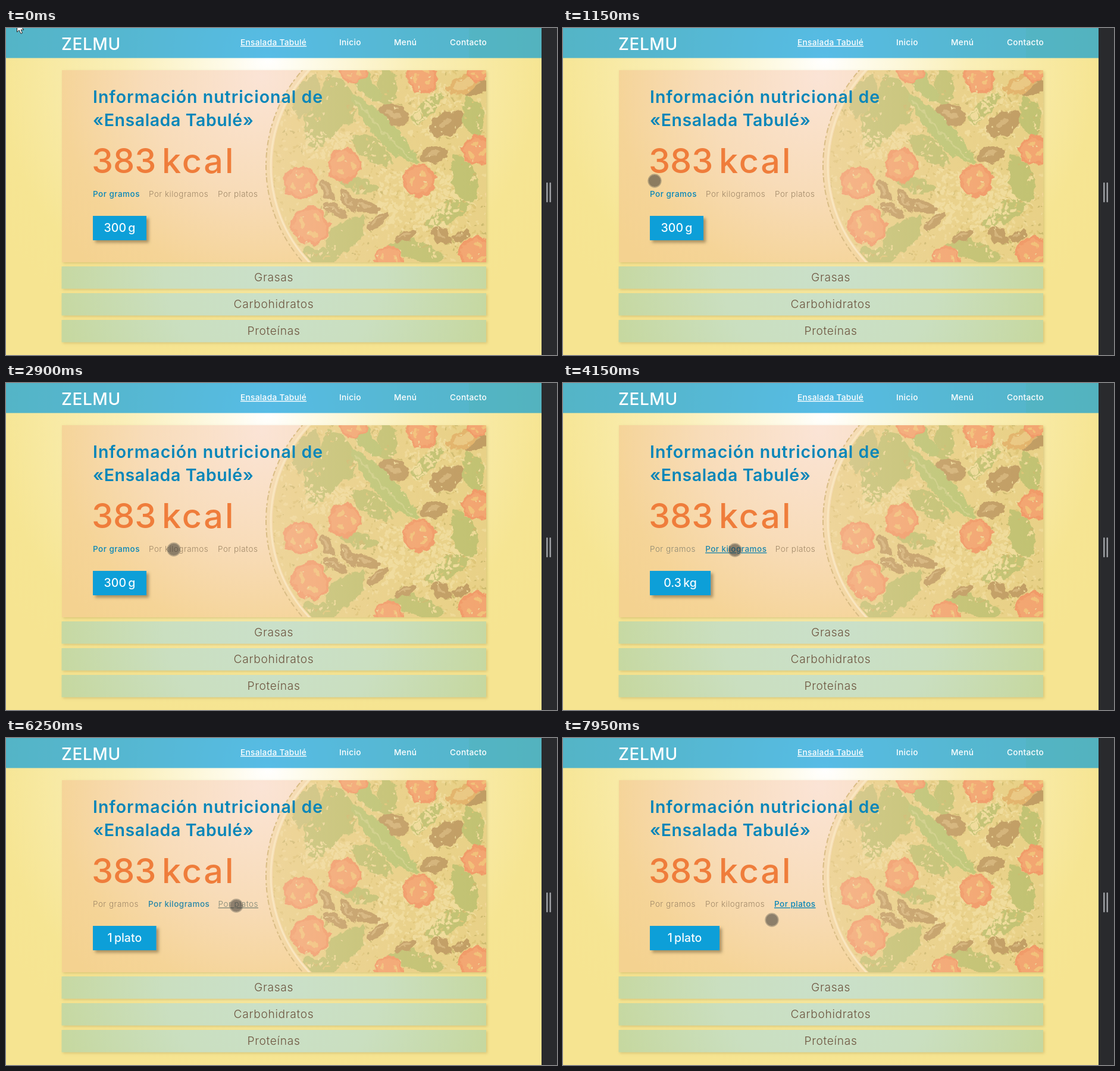
These frames come from a looping animation (926 px wide and 550 px high, 8000 ms). An HTML page:

```html
<!DOCTYPE html>
<html lang="es">
<head>
<meta charset="utf-8">
<title>Información nutricional</title>
<style>
  html, body { margin: 0; width: 100%; height: 100%; overflow: hidden; background: #292a2d; }
  svg { display: block; width: 926px; height: 550px; }
  text { font-family: Inter, "Open Sans", sans-serif; letter-spacing: .035em; }
  .nav { font-size: 13.7px; font-weight: 500; fill: #fff; letter-spacing: .022em; }
  .title { font-size: 28.5px; font-weight: 600; fill: #0886b9; }
  .energy { font-size: 57.5px; font-weight: 500; fill: #ef7d3b; }
  .tab { font-size: 13.5px; }
  .bar { font-size: 19.2px; font-weight: 300; fill: #6d543f; text-anchor: middle; }
  #amount { font-size: 19.5px; font-weight: 500; fill: #f4fbff; text-anchor: middle; letter-spacing: 0; }
</style>
</head>
<body>
<svg viewBox="0 0 926 550" xmlns="http://www.w3.org/2000/svg">
  <defs>
    <radialGradient id="page" gradientUnits="userSpaceOnUse" cx="440" cy="50" r="540">
      <stop offset="0" stop-color="#fff"/>
      <stop offset=".12" stop-color="#fefbea"/>
      <stop offset=".45" stop-color="#faefb8"/>
      <stop offset=".85" stop-color="#f6e593"/>
      <stop offset="1" stop-color="#f6e491"/>
    </radialGradient>
    <radialGradient id="paper" gradientUnits="userSpaceOnUse" cx="430" cy="80" r="430">
      <stop offset="0" stop-color="#fbe4d6"/>
      <stop offset=".45" stop-color="#f8dcb9"/>
      <stop offset=".8" stop-color="#f5d497"/>
      <stop offset="1" stop-color="#f4d290"/>
    </radialGradient>
    <radialGradient id="mint" gradientUnits="userSpaceOnUse" cx="450" cy="400" r="370">
      <stop offset="0" stop-color="#cae0ca"/>
      <stop offset=".5" stop-color="#cadfc0"/>
      <stop offset="1" stop-color="#c6d8a0"/>
    </radialGradient>
    <linearGradient id="wash">
      <stop offset="0" stop-color="#fadcb8" stop-opacity=".4"/>
      <stop offset=".5" stop-color="#f8d9a2" stop-opacity=".25"/>
      <stop offset="1" stop-color="#f5d680" stop-opacity=".14"/>
    </linearGradient>
    <clipPath id="cardClip"><path d="M94 71H807V394H94Z"/></clipPath>
    <clipPath id="dishClip"><circle cx="680" cy="232" r="232"/></clipPath>
    <filter id="shadow" x="-10%" y="-30%" width="125%" height="180%">
      <feDropShadow dx="2" dy="2" stdDeviation="2.2" flood-color="#a89248" flood-opacity=".36"/>
    </filter>
    <filter id="deep" x="-10%" y="-20%" width="130%" height="160%">
      <feDropShadow dx="4" dy="4" stdDeviation="2.5" flood-color="#6d5a38" flood-opacity=".55"/>
    </filter>
    <filter id="rough" filterUnits="userSpaceOnUse" x="430" y="60" width="390" height="345" color-interpolation-filters="sRGB">
      <feTurbulence type="fractalNoise" baseFrequency=".07" numOctaves="3" seed="4"/>
      <feDisplacementMap in="SourceGraphic" scale="14" xChannelSelector="R" yChannelSelector="G"/>
    </filter>
  </defs>

  <path d="M0 0H900V550H0Z" fill="url(#page)"/>
  <path d="M0 0H900V50.500H0Z" fill="#11a0dc" fill-opacity=".7"/>
  <path d="M778 0H900V50.500H778Z" fill="#4cab9c" fill-opacity=".16"/>
  <path d="M900 0H926V550H900Z" fill="#292a2d"/>
  <path d="M909.3 261V292M914.7 261V292" stroke="#a2a5a9" stroke-width="2.4" stroke-linecap="round"/>

  <text x="93" y="37" font-size="28" font-weight="500" fill="#fff" style="letter-spacing:.02em">ZELMU</text>
  <text class="nav" x="394" y="29" text-decoration="underline">Ensalada Tabulé</text>
  <text class="nav" x="560" y="29">Inicio</text>
  <text class="nav" x="652" y="29">Menú</text>
  <text class="nav" x="746" y="29">Contacto</text>

  <path d="M94 71H807V394H94Z" fill="url(#paper)" filter="url(#shadow)"/>
  <g clip-path="url(#cardClip)">
    <circle cx="680" cy="232" r="243" fill="#f3d9a6" fill-opacity=".6" stroke="#d9bd86" stroke-width="2" stroke-dasharray="9 3 4 5"/>
    <circle cx="680" cy="232" r="235" fill="none" stroke="#f9e6c0" stroke-width="3"/>
    <g clip-path="url(#dishClip)">
      <g id="salad" filter="url(#rough)"></g>
      <path d="M436 71H807V394H436Z" fill="url(#wash)"/>
    </g>
  </g>

  <text class="title" x="146" y="126">Información nutricional de</text>
  <text class="title" x="146" y="165" style="letter-spacing:.02em">«Ensalada Tabulé»</text>
  <text class="energy" x="144" y="244" style="letter-spacing:0">383</text>
  <text class="energy" x="262" y="244" style="letter-spacing:.05em">kcal</text>
  <text class="tab" y="284">Por gramos</text>
  <text class="tab" y="284">Por kilogramos</text>
  <text class="tab" y="284">Por platos</text>
  <rect id="button" x="146" y="316" height="41" fill="#109fd8" filter="url(#deep)"/>
  <text id="amount" y="343"></text>

  <g fill="url(#mint)" filter="url(#shadow)">
    <path d="M93.500 401H807V438.500H93.500Z"/>
    <path d="M93.500 446H807V483.500H93.500Z"/>
    <path d="M93.500 491H807V528.500H93.500Z"/>
  </g>
  <text class="bar" x="450" y="426">Grasas</text>
  <text class="bar" x="450" y="471">Carbohidratos</text>
  <text class="bar" x="450" y="516">Proteínas</text>

  <path id="arrow" d="M18.500 -9V7L22 3.500L25 9.500L27.500 8.300L25 3H30Z" fill="#fff" stroke="#222" stroke-width="1"/>
  <g id="touch">
    <circle r="10" fill="#2d2d2d" fill-opacity=".53"/>
    <circle r="10.700" fill="none" stroke="#6b6658" stroke-opacity=".45" stroke-width="2"/>
  </g>
</svg>

<script>
const $ = id => document.getElementById(id);

// Salad illustration
let seed = 7;
const random = () => (seed = seed * 16807 % 2147483647) / 2147483647;

const ellipse = (x, y, rx, ry, angle, fill) =>
  `<ellipse rx="${rx}" ry="${ry}" fill="${fill}" transform="translate(${x} ${y}) rotate(${angle})"/>`;

const shape = (d, fill) => `<path d="${d}" fill="${fill}"/>`;

const leaf = (x, y, length, width, angle, fill = '#b9bf70') =>
  `<g transform="translate(${x} ${y}) rotate(${angle})">` +
  shape(`M${-length} 0Q${-length / 3} ${-width * 1.7} ${length} 0Q${length / 4} ${width * 1.6} ${-length} 0`, fill) +
  '</g>';

// Dots scattered over an area, drawn as one round-capped path
function grains(count, size, color, x, y, w, h) {
  let d = '';
  for (let i = 0; i < count; i++) {
    d += `M${(x + random() * w).toFixed(1)} ${(y + random() * h).toFixed(1)}h.1`;
  }
  return `<path d="${d}" stroke="${color}" stroke-width="${size}" stroke-linecap="round"/>`;
}

function tomato(x, y, r, angle) {
  let s = ellipse(x, y, r, r * .96, angle, '#f09064') + ellipse(x, y, r * .84, r * .8, angle, '#f29d6e');
  for (let i = 0; i < 3; i++) {
    const a = angle * Math.PI / 180 + i * 2.1;
    s += ellipse(x + r * .46 * Math.cos(a), y + r * .46 * Math.sin(a), r * .24, r * .13, angle + i * 120 + 90, '#f1bd78');
  }
  return s;
}

const olive = (x, y, rx, ry, angle) =>
  ellipse(x, y, rx, ry, angle, '#b8945f') + ellipse(x - 2, y - 2, rx * .5, ry * .28, angle, '#cdad78');

const everywhere = [440, 71, 367, 323];
$('salad').innerHTML = [
  shape('M430 60H810V400H430Z', '#e6d088'),
  leaf(530, 150, 60, 34, 100), leaf(560, 120, 50, 28, 60),
  leaf(570, 350, 48, 28, -50), leaf(615, 205, 42, 24, 30),
  leaf(690, 375, 50, 22, 12), leaf(770, 255, 46, 25, 70),
  leaf(745, 310, 46, 22, -35), leaf(785, 150, 38, 24, 75),
  leaf(525, 385, 38, 18, 5), leaf(640, 100, 36, 22, 80),
  leaf(708, 135, 38, 16, -50), leaf(595, 265, 34, 16, 10),
  grains(420, 5, '#edda9a', ...everywhere),
  grains(350, 4, '#dac376', ...everywhere),
  grains(190, 4, '#c5b56b', ...everywhere),
  grains(230, 6, '#eedd9f', 625, 235, 135, 105),
  grains(140, 5, '#eedd9f', 680, 95, 85, 90),
  grains(100, 5, '#eedd9f', 500, 175, 80, 45),
  leaf(550, 145, 44, 27, 95), leaf(505, 115, 40, 24, 110, '#c0bf78'),
  leaf(575, 350, 38, 22, -70), leaf(765, 260, 36, 20, 65), leaf(690, 377, 40, 15, 20),
  olive(652, 147, 29, 17, 20), olive(740, 161, 30, 19, -28),
  olive(719, 213, 22, 14, -8), olive(790, 100, 22, 10, -30),
  ellipse(769, 95, 29, 15, -22, '#dfae68'), ellipse(768, 95, 20, 7, -22, '#e8c684'),
  olive(605, 300, 25, 11, 15), olive(575, 290, 24, 9, 55),
  olive(553, 307, 22, 9, 30), olive(625, 325, 22, 8, -40),
  olive(732, 349, 20, 12, 35), olive(672, 350, 21, 8, -25),
  olive(540, 272, 21, 8, 65), olive(765, 350, 16, 8, -20),
  shape('M577 112C585 105 598 115 615 132C650 158 680 190 695 226C680 230 657 220 638 200C614 175 592 147 577 112Z', '#b3c474'),
  '<path d="M590 125Q635 180 682 222" fill="none" stroke="#c6cf88" stroke-width="3" stroke-linecap="round"/>',
  shape('M566 71H604C611 86 622 99 634 117C626 130 609 122 598 108C586 95 577 84 566 71Z', '#b2c272'),
  tomato(583, 72, 22, 15), tomato(700, 83, 27, 50), tomato(794, 72, 20, 10),
  tomato(495, 260, 29, 30), tomato(512, 331, 33, 75), tomato(569, 231, 29, 120),
  tomato(694, 256, 28, 60), tomato(791, 206, 25, 20), tomato(790, 379, 28, 45),
  tomato(643, 392, 26, 95),
  grains(130, 3, '#eddb9f', ...everywhere)
].join('');

// Animation
const LOOP = 8000;
const SWITCH_MS = 750;
const TO_KILOS = 3500;
const TO_PLATES = 6100;
const ACTIVE = [8, 134, 184];
const IDLE = [160, 136, 104];

// Left edges of the three tabs and the button width, for each chosen unit
const units = [
  { amount: '300\u2009g', tabs: [146, 240, 356], width: 90 },
  { amount: '0.3\u2009kg', tabs: [146, 239, 357], width: 104 },
  { amount: '1\u2009plato', tabs: [146, 239, 355], width: 117 }
];

// Pointer stops: time, x, y
const stops = [
  [200, 17, 4], [1000, 153, 256], [1150, 154, 257], [1900, 190, 290],
  [1950, 190, 290], [2700, 280, 280], [2900, 282, 280], [3150, 289, 281],
  [4550, 289, 281], [5000, 351, 293], [5350, 372, 290], [5400, 372, 290],
  [5600, 387, 282], [7450, 387, 282], [7950, 351, 306], [LOOP, 351, 306]
];

const tabs = [...document.querySelectorAll('.tab')];
const clamp = v => Math.min(1, Math.max(0, v));
const mix = (a, b, p) => a + (b - a) * p;
const smooth = p => p * p * (3 - 2 * p);

function pointerAt(t) {
  const i = Math.max(1, stops.findIndex(s => s[0] > t));
  const [t0, x0, y0] = stops[i - 1], [t1, x1, y1] = stops[i];
  const p = smooth(clamp((t - t0) / (t1 - t0)));
  return [mix(x0, x1, p), mix(y0, y1, p)];
}

function draw(t) {
  const kilos = clamp((t - TO_KILOS) / SWITCH_MS);
  const plates = clamp((t - TO_PLATES) / SWITCH_MS);
  const chosen = t >= TO_PLATES ? 2 : t >= TO_KILOS ? 1 : 0;
  const previous = units[Math.max(0, chosen - 1)], current = units[chosen];
  const progress = chosen === 2 ? plates : kilos;
  const levels = [1 - kilos, kilos - plates, plates];

  tabs.forEach((tab, i) => {
    tab.setAttribute('x', mix(previous.tabs[i], current.tabs[i], progress));
    tab.style.fill = `rgb(${IDLE.map((c, k) => Math.round(mix(c, ACTIVE[k], levels[i])))})`;
    tab.style.fontWeight = Math.round(mix(300, 500, levels[i]));
    tab.style.textDecoration = chosen && i === chosen ? 'underline' : 'none';
  });

  const width = mix(previous.width, current.width, progress);
  $('button').setAttribute('width', width);
  $('amount').setAttribute('x', 146 + width / 2);
  $('amount').textContent = current.amount;

  const entered = t >= 200;
  $('arrow').style.display = entered ? 'none' : '';
  $('touch').style.display = entered ? '' : 'none';
  $('touch').setAttribute('transform', `translate(${pointerAt(t)})`);
}

const start = performance.now();
function tick() {
  draw((performance.now() - start) % LOOP);
  requestAnimationFrame(tick);
}
tick();
</script>
</body>
</html>
```
